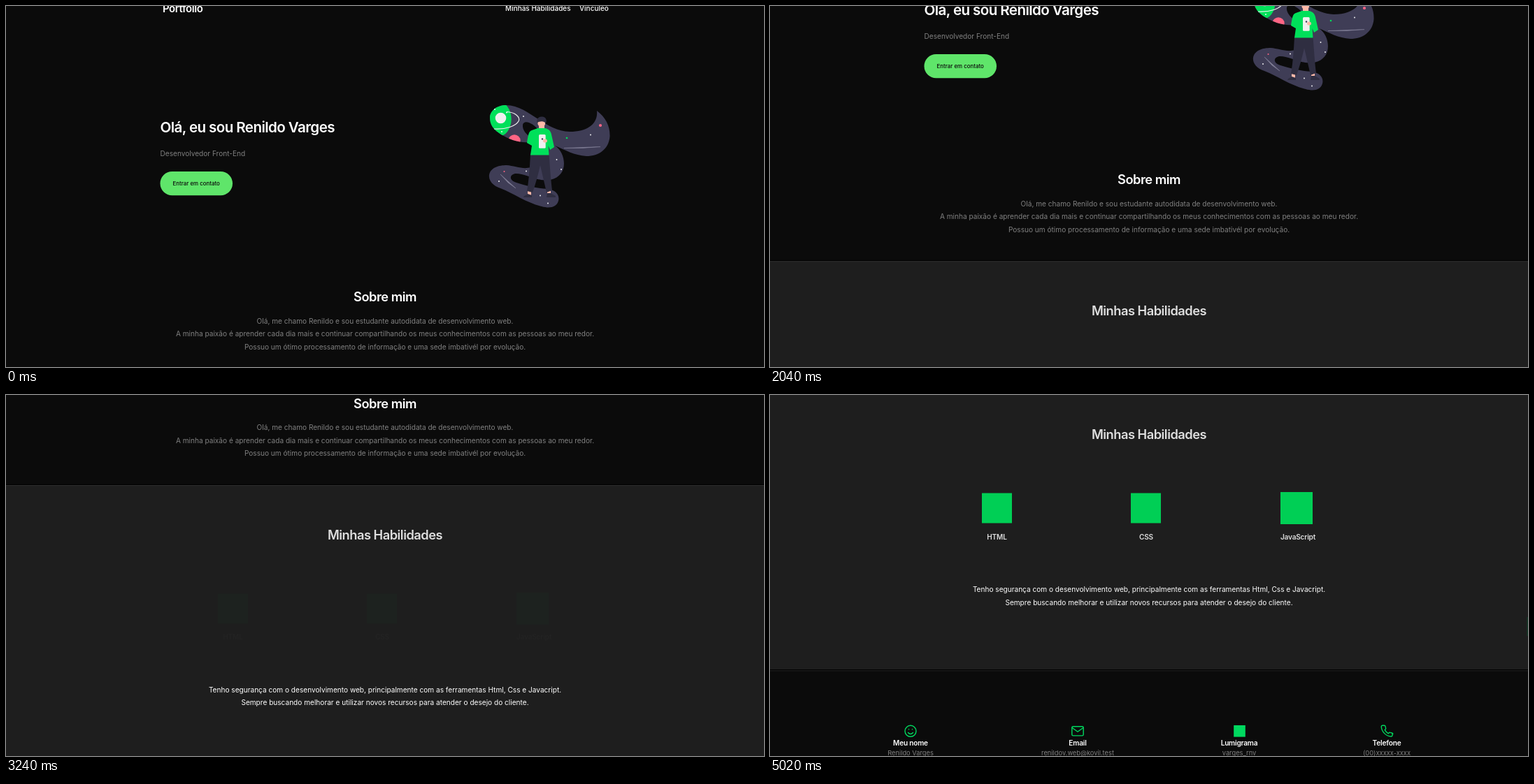
These frames come from a looping animation (1084x517 px, 6230 ms). An HTML page:

```html
<!DOCTYPE html>
<html lang="pt-BR">
<head>
<meta charset="utf-8">
<title>Portfólio</title>
<style>
  html, body { margin: 0; width: 100%; height: 100%; overflow: hidden; background: #0b0b0b; }
  svg { display: block; width: 1084px; height: 517px; font: 10.1px Inter, "Open Sans", sans-serif; }
  text { fill: #808080; }
  .mid { text-anchor: middle; }
  .white { fill: #fff; }
  .soft { fill: #dedede; }
  .nav { font-size: 10px; font-weight: 500; }
  .brand { font-size: 14.9px; font-weight: 600; letter-spacing: -.4px; }
  .hero { font-size: 20.6px; font-weight: 600; letter-spacing: -.6px; }
  .head { font-size: 18.3px; font-weight: 600; letter-spacing: -.5px; }
  .label { font-weight: 600; letter-spacing: -.2px; }
  .value { font-size: 9.3px; }
  .button { font-size: 7.9px; font-weight: 500; fill: #0b0b0b; }
  .line { fill: none; stroke: #00d95f; stroke-width: 1.4; stroke-linecap: round; stroke-linejoin: round; }
</style>
</head>
<body>
<svg viewBox="0 0 1084 517">
  <defs>
    <path id="ribbon" d="M715 142C747 142 768 178 806 180C832 180 847 168 845 150C858 160 864 172 863.5 187
      C862 205 848 215 830 215C813 214 799 206 785 200C796 207 800 222 797 233C793 246 780 251 765 249
      C750 246 738 239 728 240C719 242 720 250 730 253C745 258 760 261 775 262C787 264 792 271 790 279
      C787 289 777 290 766 287C745 282 727 269 707 261C695 257 690 249 691 242C693 231 705 228 716 228
      C730 229 747 238 757 226C764 216 758 198 748 195C732 196 720 191 708 184C697 177 692 170 692 160
      C692 150 702 142 715 142Z"/>
    <clipPath id="inside"><use href="#ribbon"/></clipPath>
  </defs>
  <rect width="1084" height="517" fill="#0b0b0b"/>
  <g id="page">
    <text class="brand white" x="224" y="9">Portfólio</text>
    <text class="nav white" x="714" y="7">Minhas Habilidades</text>
    <text class="nav white" x="820" y="7">Vinculeo</text>

    <text class="hero white" x="220.5" y="181">Olá, eu sou Renildo Varges</text>
    <text x="220.5" y="215">Desenvolvedor Front-End</text>
    <rect x="220.5" y="237" width="103.5" height="34.3" rx="17.1" fill="#5fe56a"/>
    <text class="button mid" x="272.2" y="257">Entrar em contato</text>

    <g>
      <use href="#ribbon" fill="#3f3d56"/>
      <path fill="#0b0b0b" d="M739 170C741 163 752 166 764 180L753 190C745 185 738 178 739 170Z"/>
      <g clip-path="url(#inside)">
        <ellipse cx="704" cy="162" rx="18.7" ry="25" fill="#00e05a"/>
        <circle cx="727" cy="193" r="8.7" fill="#ff6584"/>
      </g>
      <circle cx="707.5" cy="160.5" r="7.8" fill="#f0f0f0"/>
      <path d="M716 151.5C728 152 736 159 733 165C729 172 715 177 698 176" fill="none" stroke="#f0f0f0" stroke-width="1.2"/>
      <path d="M798 203.5L850 201.6L825 203.4ZM707 241L729 261L718 253Z" fill="#85839a" stroke="#85839a" stroke-width=".5"/>
      <g id="stars" fill="#fff"></g>
      <circle cx="850" cy="171" r="2.1" fill="#ff6584"/>
      <circle cx="802" cy="189" r="1.3" fill="#00e05a"/>
      <circle cx="712.5" cy="237" r="1" fill="#ff6584"/>
      <path fill="#ffb9a8" d="M746 265h5v6h-5zM774 263h5v7h-5zM762 170h8v7h-8z"/>
      <path fill="#2f2e41" d="M750 212H776.5C778 232 779 248 781 264L773 267L764 228C761 242 757 256 753 267L745 265C748 248 749 230 750 212Z
        M746 269L752 271V274H740C741 271 744 271 746 269ZM774 268H779L786 272V274H773Z"/>
      <path fill="#00e05a" d="M760 175H771C776 176 779 179 780 184L784 202L778 206L775.5 200L776.5 213.5H750L752 200L745 196
        C746 189 747 183 749 180C752 177 756 177 760 175Z"/>
      <circle cx="765.8" cy="168" r="5.4" fill="#ffb9a8"/>
      <path fill="#2f2e41" d="M759.5 167C758 161 762 158 767 158.5C772 159 774 163 772 168C769 164 764 165 759.5 167Z"/>
      <rect x="762" y="184" width="9.7" height="19.7" rx="1.5" fill="#f0f0f0"/>
      <circle cx="767" cy="190.5" r="1.2" fill="#3f3d56"/>
      <ellipse cx="771" cy="193" rx="3" ry="2.6" fill="#ffb9a8"/>
    </g>

    <text class="head white mid" x="542" y="423">Sobre mim</text>
    <g class="mid">
      <text x="542" y="454.5">Olá, me chamo Renildo e sou estudante autodidata de desenvolvimento web.</text>
      <text x="542" y="473">A minha paixão é aprender cada dia mais e continuar compartilhando os meus conhecimentos com as pessoas ao meu redor.</text>
      <text x="542" y="491.5">Possuo um ótimo processamento de informação e uma sede imbativél por evolução.</text>
    </g>

    <rect y="532" width="1084" height="411" fill="#000"/>
    <rect y="533.3" width="1084" height="407.7" fill="#1e1e1e"/>
    <path d="M0 533.8H1084" stroke="#303030"/>
    <path d="M0 942.8H1084" stroke="#242424"/>
    <text class="head soft mid" x="542" y="611">Minhas Habilidades</text>
    <g id="skills" class="mid">
      <g fill="#00cf55">
        <rect x="303" y="688.5" width="43" height="43"/>
        <rect x="516" y="688.5" width="43" height="43"/>
        <rect x="730" y="687" width="46" height="46"/>
      </g>
      <text class="label soft" x="324.5" y="754.5">HTML</text>
      <text class="label soft" x="538" y="754.5">CSS</text>
      <text class="label soft" x="755" y="754.5">JavaScript</text>
    </g>
    <g class="mid">
      <text class="white" x="542" y="830">Tenho segurança com o desenvolvimento web, principalmente com as ferramentas Html, Css e Javacript.</text>
      <text class="white" x="542" y="848.5">Sempre buscando melhorar e utilizar novos recursos para atender o desejo do cliente.</text>
    </g>

    <g class="line">
      <circle cx="201" cy="1029.3" r="8"/>
      <path d="M197.5 1031.5Q201 1035.5 204.5 1031.5M198.5 1026.8v.1M203.5 1026.8v.1"/>
      <rect x="431.8" y="1022.7" width="16.4" height="13.2" rx="1.7"/>
      <path d="M432 1024.5L440 1030.3L448 1024.5"/>
      <path d="M890 1032.8v2.5c0 1-.8 1.8-1.8 1.7c-7.5-.5-13.3-6.5-14-14c0-1 .7-1.8 1.7-1.8h2.5
        c.8 0 1.5.6 1.6 1.4l.6 2.4c.2.6 0 1.3-.4 1.7l-1 1c1.2 2.2 2.9 3.9 5.1 5.1l1-1
        c.5-.5 1.1-.6 1.7-.4l2.4.6c.8.1 1.4.8 1.4 1.6z"/>
    </g>
    <rect x="663.2" y="1021" width="16.6" height="16.6" fill="#00d95f"/>
    <g id="contacts" class="mid"></g>
  </g>
  <rect id="edge" x="1082.5" y="318" width="1.5" height="27" fill="#143626"/>
</svg>
<script>
  const LOOP = 6230, START = 1060, STEP = 69.41;
  const $ = id => document.getElementById(id);

  $('stars').innerHTML = [
    [699, 148], [716, 152.5], [709, 180], [740, 158], [836, 184.5], [787.5, 220], [794, 234],
    [744, 236.5], [705, 251], [764, 271.5], [775, 282.5]
  ].map(([x, y]) => `<circle cx="${x}" cy="${y}" r=".9"/>`).join('');

  $('contacts').innerHTML = [
    [201, 'Meu nome', 'Renildo Varges'],
    [440, 'Email', 'renildov.web@kovil.test'],
    [671, 'Lumigrama', 'varges_rnv'],
    [882, 'Telefone', '(00)xxxxx-xxxx']
  ].map(([x, label, value]) =>
    `<text class="label white" x="${x}" y="1049.7">${label}</text><text class="value" x="${x}" y="1063.5">${value}</text>`
  ).join('');

  // Scroll position by step, joined by a monotone cubic.
  const keys = [[0, 3.5], [8, 109.5], [14, 168], [26, 343], [36, 458], [45, 537], [51, 548]];
  const slope = i => (keys[i + 1][1] - keys[i][1]) / (keys[i + 1][0] - keys[i][0]);
  const tangent = i => {
    if (i === 0) return slope(0) * .8;
    if (i === keys.length - 1) return 0;
    const a = slope(i - 1), b = slope(i);
    return 2 * a * b / (a + b);
  };

  function scrollAt(k) {
    if (k < 0) return 0;
    if (k >= 51) return 548;
    const i = keys.findIndex(key => key[0] > k) - 1;
    const [x, y] = keys[i], [x2, y2] = keys[i + 1];
    const w = x2 - x, u = (k - x) / w, v = 1 - u;
    return y * v * v * (1 + 2 * u) + y2 * u * u * (3 - 2 * u)
      + w * u * v * (tangent(i) * v - tangent(i + 1) * u);
  }

  function smooth(from, to, k) {
    const u = Math.min(1, Math.max(0, (k - from) / (to - from)));
    return u * u * (3 - 2 * u);
  }

  const begin = performance.now();
  function draw() {
    const t = (performance.now() - begin) % LOOP;
    const k = Math.floor((t - START) / STEP + .02);
    $('page').setAttribute('transform', `translate(0 ${-scrollAt(k).toFixed(2)})`);
    $('skills').setAttribute('opacity', smooth(30, 42, k));
    $('edge').setAttribute('opacity', t >= 4600 ? 1 : 0);
    requestAnimationFrame(draw);
  }
  draw();
</script>
</body>
</html>
```
